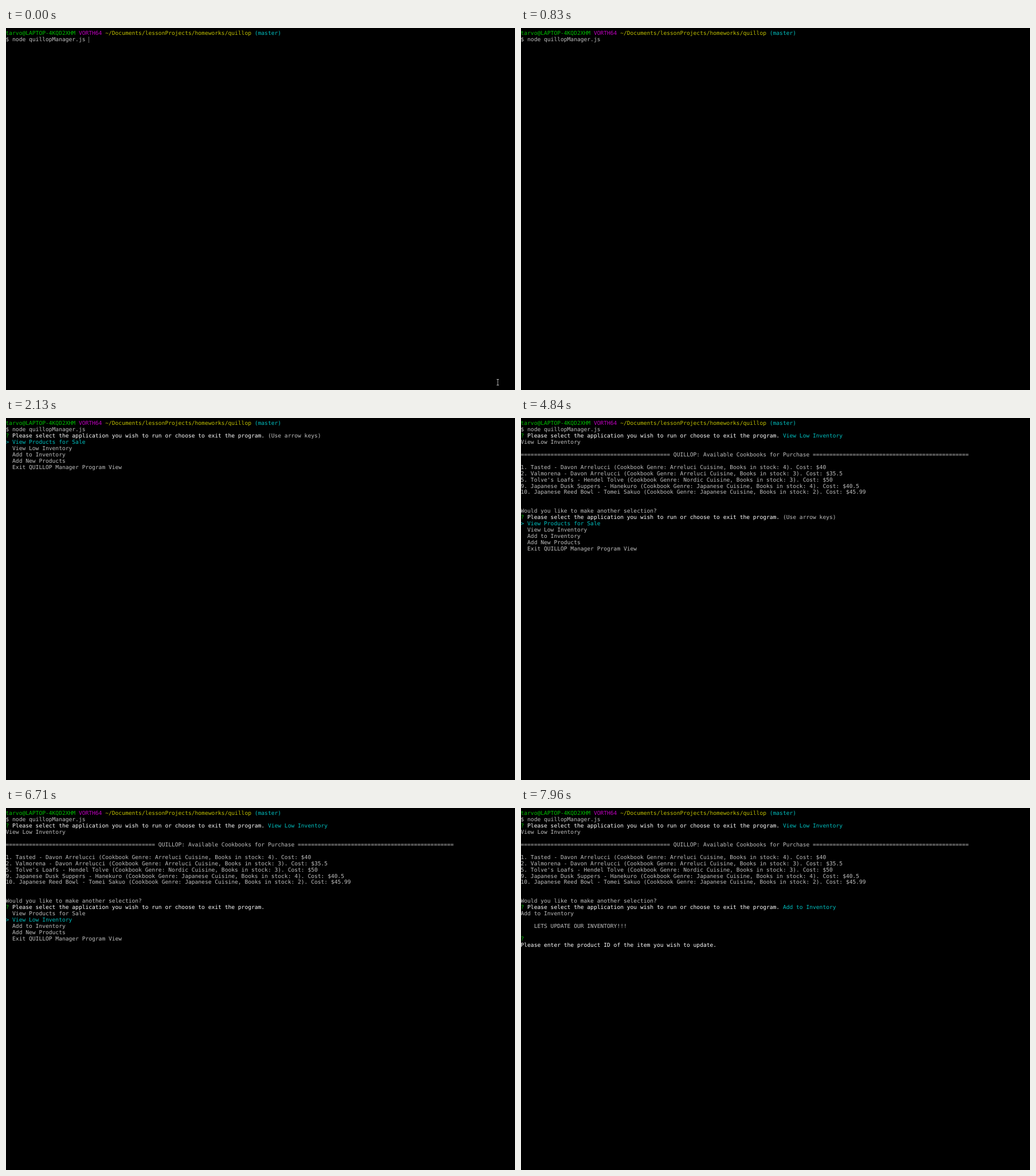
These frames come from a looping animation (888x631 px, 8 s). An HTML page with a canvas:

```html
<!DOCTYPE html>
<html lang="en">
<head>
<meta charset="utf-8">
<title>Terminal session</title>
<style>
  html, body { margin: 0; width: 100%; height: 100%; overflow: hidden; background: #000; }
  canvas { display: block; }
</style>
</head>
<body>
<canvas id="stage" width="888" height="631"></canvas>
<script>
const ctx = document.getElementById('stage').getContext('2d');
const LOOP = 8000;
const CELL_W = 5.79, CELL_H = 10.95, LEFT = -0.5, BASELINE = 12;
const GREY = '#bfbfbf', WHITE = '#fff', GREEN = '#00bf00', CYAN = '#00bfbf',
      YELLOW = '#bfbf00', PURPLE = '#bf00bf';

const QUESTION = 'Please select the application you wish to run or choose to exit the program. ';
const HINT = '(Use arrow keys)';
const MENU = [
  'View Products for Sale',
  'View Low Inventory',
  'Add to Inventory',
  'Add New Products',
  'Exit QUILLOP Manager Program View'
];
const BOOKS = [
  ['1', 'Tasted - Davon Arrelucci', 'Arreluci', 4, '40'],
  ['2', 'Valmorena - Davon Arrelucci', 'Arreluci', 3, '35.5'],
  ['5', "Tolve's Loafs - Hendel Tolve", 'Nordic', 3, '50'],
  ['9', 'Japanese Dusk Suppers - Hanekuro', 'Japanese', 4, '40.5'],
  ['10', 'Japanese Reed Bowl - Tomei Sakuo', 'Japanese', 2, '45.99']
];

// Writes [text, colour] runs on the character grid.
function line(row, ...runs) {
  const y = Math.round(BASELINE + row * CELL_H);
  let col = 0;
  for (const [text, color = GREY] of runs) {
    ctx.fillStyle = color;
    for (const ch of text) {
      if (ch !== ' ') ctx.fillText(ch, LEFT + col * CELL_W, y);
      col++;
    }
  }
}

function question(row, tail = '', color = GREY) {
  line(row, ['? ', GREEN], [QUESTION, WHITE], [tail, color]);
}

function menu(row, selected) {
  question(row, selected === 0 ? HINT : '');
  MENU.forEach((item, i) => {
    const on = i === selected;
    line(row + 1 + i, [(on ? '> ' : '  ') + item, on ? CYAN : GREY]);
  });
}

function answer(row, choice) {
  question(row, MENU[choice], CYAN);
  line(row + 1, [MENU[choice]]);
}

function cursor(x, y, h, color) {
  ctx.fillStyle = color;
  ctx.fillRect(x, y, 1, h);
}

function pointer() {
  ctx.fillStyle = '#b4b4b4';
  ctx.fillRect(856, 612, 4, 1);
  ctx.fillRect(857.5, 613, 1, 9);
  ctx.fillRect(856, 622, 4, 1);
}

function prompt() {
  line(0, ['tarvo@LAPTOP-4KQD2XHM ', GREEN], ['VORTH64 ', PURPLE],
    ['~/Documents/lessonProjects/homeworks/quillop ', YELLOW], ['(master)', CYAN]);
  line(1, ['$ node quillopManager.js']);
}

function stockList() {
  answer(2, 1);
  line(5, ['='.repeat(45) + ' QUILLOP: Available Cookbooks for Purchase ' + '='.repeat(47)]);
  BOOKS.forEach(([id, title, genre, stock, cost], i) => line(7 + i, [
    `${id}. ${title} (Cookbook Genre: ${genre} Cuisine, Books in stock: ${stock}). Cost: $${cost}`
  ]));
  line(14, ['Would you like to make another selection?']);
}

function updateForm() {
  answer(15, 2);
  line(18, ['    LETS UPDATE OUR INVENTORY!!!']);
  line(20, ['?', GREEN]);
  line(21, ['Please enter the product ID of the item you wish to update.', WHITE]);
}

function draw(t) {
  ctx.fillStyle = '#000';
  ctx.fillRect(0, 0, 888, 631);
  ctx.font = '9.62px "DejaVu Sans Mono", monospace';
  ctx.textRendering = 'geometricPrecision';

  prompt();
  if (t < 70) pointer();
  if (t < 300) cursor(144, 15, 11, '#6c6c6c');
  else if (t < 830) cursor(144, 15, 11, GREY);

  if (t >= 2130 && t < 4840) menu(2, t < 3150 ? 0 : 1);
  if (t >= 4840) {
    stockList();
    if (t < 7410) menu(15, t < 6710 ? 0 : t < 7030 ? 1 : 2);
    else {
      updateForm();
      if (t < 7960) cursor(347, 234, 11, GREY);
    }
  }
}

const start = performance.now();
function tick() {
  draw((performance.now() - start) % LOOP);
  requestAnimationFrame(tick);
}
tick();
</script>
</body>
</html>
```
